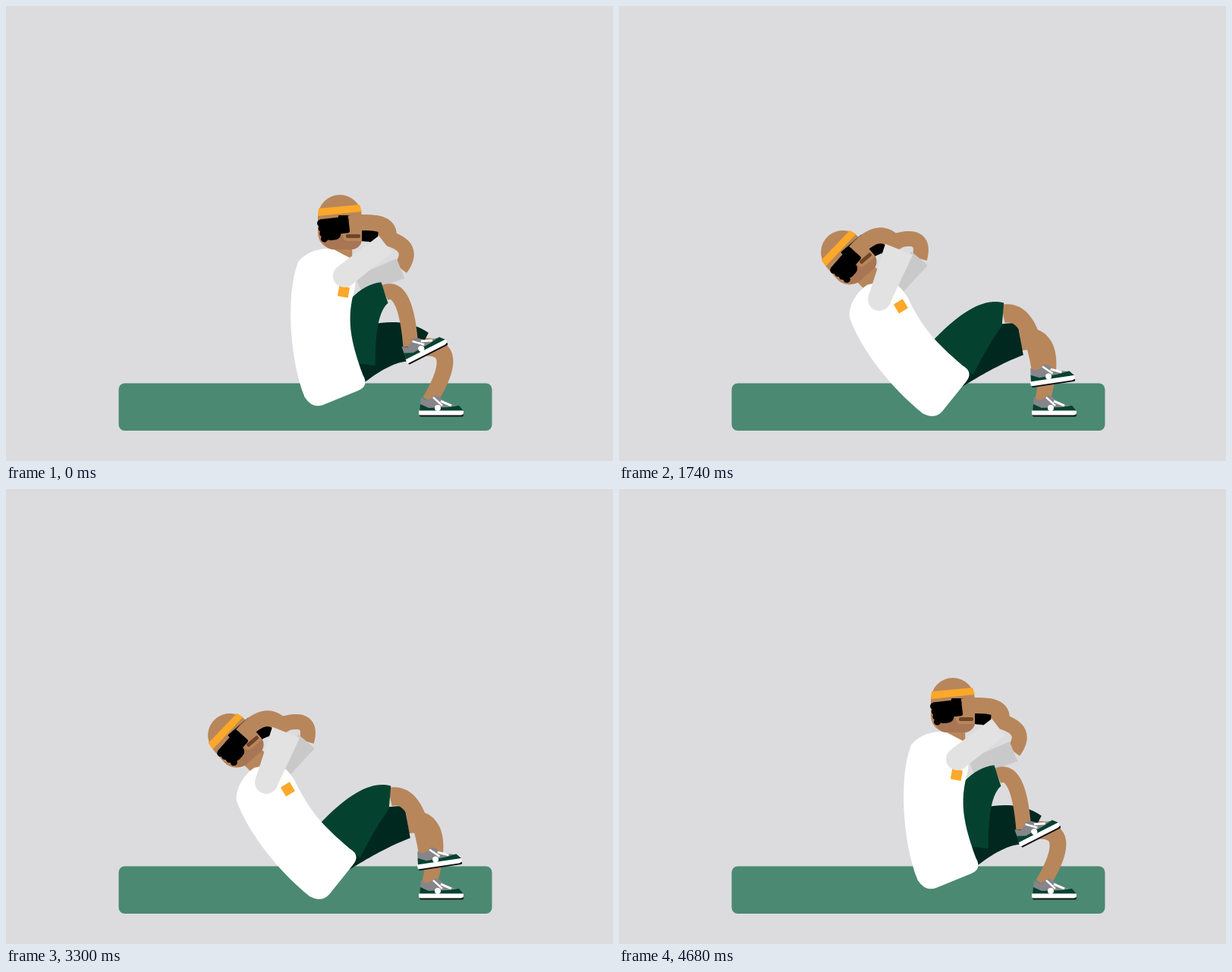
These frames come from a looping animation (800 px wide and 600 px high, 4710 ms). An HTML page with a canvas:

```html
<!DOCTYPE html>
<html lang="en">
<head>
<meta charset="utf-8">
<title>Bicycle crunches</title>
<style>
html, body { margin: 0; width: 100%; height: 100%; overflow: hidden; background: #dcdcde; }
canvas { display: block; width: 800px; height: 600px; }
</style>
</head>
<body>
<canvas id="stage" width="800" height="600"></canvas>
<script>
const ctx = document.getElementById('stage').getContext('2d');
const LOOP = 4710, CRUNCH = 780, STEP = 30;
const SKIN = '#b8865b', BEARD = '#a87654', BAND = '#fca829', BLACK = '#000';
const NEAR = '#04422f', FAR = '#01281f';
const PELVIS = [438, 514], PLANT = [559, 543];

// Joints while sitting up, halfway and almost lying
const MID = 0.44, LOW = 0.874;
const TORSO = {
  neck: [[443, 326], [340, 364], [265, 445]],
  head: [[440, 278], [295, 325], [210, 446]],
  shoulder: [[446, 356], [343, 387], [283, 468]],
  sleeve: [[500, 314], [369, 321], [266, 396]],
  elbow: [[519, 279], [347, 283], [245, 369]],
  wrist: [[452, 287], [311, 324], [223, 436]],
  farShoulder: [[465, 368], [360, 375], [289, 433]],
  farSleeve: [[520, 346], [396, 333], [292, 393]],
  farElbow: [[547, 310], [408, 290], [276, 352]],
  farWrist: [[480, 302], [342, 318], [218, 406]]
};
const PLANTED = {
  hip: [[455, 466], [438, 470], [418, 494]],
  thigh: [[512, 432], [490, 446], [484, 446]],
  knee: [[547, 450], [529, 439], [515, 449]],
  calf: [[604, 445], [580, 432], [550, 426]],
  heel: [PLANT, PLANT, PLANT]
};
const RAISED = {
  hip: [[452, 470], [438, 466], [418, 480]],
  thigh: [[462, 390], [482, 404], [470, 418]],
  knee: [[499, 378], [506, 406], [512, 432]],
  calf: [[527, 366], [543, 398], [545, 418]],
  heel: [[530, 473], [543, 503], [554, 525]]
};

const lerp = (a, b, k) => a + (b - a) * k;
const mixPoint = (p, q, k) => [lerp(p[0], q[0], k), lerp(p[1], q[1], k)];

// Quadratic through the three poses
function blend([a, b, c], u) {
  const wa = (u - MID) * (u - LOW) / (MID * LOW);
  const wb = u * (u - LOW) / (MID * (MID - LOW));
  const wc = u * (u - MID) / (LOW * (LOW - MID));
  return a.map((v, i) => v * wa + b[i] * wb + c[i] * wc);
}

function pose(joints, u) {
  const out = {};
  for (const name in joints) out[name] = blend(joints[name], u);
  return out;
}

// Maps local coordinates of a turned part to the stage
function frame([ox, oy], deg) {
  const a = deg * Math.PI / 180, c = Math.cos(a), s = Math.sin(a);
  return (x, y) => [ox + x * c - y * s, oy + x * s + y * c];
}

function place([x, y], deg, paint) {
  ctx.save();
  ctx.translate(x, y);
  ctx.rotate(deg * Math.PI / 180);
  paint();
  ctx.restore();
}

// Tapered band along a quadratic curve
function tube(p, c, q, w0, w1, color) {
  const left = [], right = [], n = 20;
  for (let i = 0; i <= n; i++) {
    const t = i / n, a = mixPoint(p, c, t), b = mixPoint(c, q, t);
    const [x, y] = mixPoint(a, b, t);
    const dx = b[0] - a[0], dy = b[1] - a[1];
    const k = lerp(w0, w1, t) / 2 / Math.hypot(dx, dy);
    left.push([x + dy * k, y - dx * k]);
    right.unshift([x - dy * k, y + dx * k]);
  }
  shape([...left, ...right], color);
}

const bar = (p, q, w0, w1, color) => tube(p, mixPoint(p, q, .5), q, w0, w1, color);

function shape(points, color) {
  ctx.beginPath();
  for (const p of points) ctx.lineTo(...p);
  ctx.fillStyle = color;
  ctx.fill();
}

function box(x, y, w, h, r, color) {
  ctx.beginPath();
  ctx.roundRect(x, y, w, h, r);
  ctx.fillStyle = color;
  ctx.fill();
}

function dot([x, y], r, color) {
  ctx.beginPath();
  ctx.arc(x, y, r, 0, 7);
  ctx.fillStyle = color;
  ctx.fill();
}

function drawShirt(chest, pelvis, drop) {
  const curve = (...pts) => ctx.bezierCurveTo(...pts.flat());
  const bend = (...pts) => ctx.quadraticCurveTo(...pts.flat());
  ctx.beginPath();
  ctx.moveTo(...chest(15, 6));
  bend(chest(23, 18), chest(23, drop - 6));
  curve(chest(17, 85), pelvis(41, -62), pelvis(40, -14));
  bend(pelvis(43, 3), pelvis(26, 3));
  ctx.lineTo(...pelvis(-23, 4));
  bend(pelvis(-38, 4), pelvis(-42, -14));
  curve(pelvis(-43, -68), chest(-66, 64), chest(-56, 20));
  curve(chest(-50, 8), chest(-34, -3), chest(-13, -4));
  bend(chest(3, 2), chest(15, 6));
  ctx.fillStyle = '#fff';
  ctx.fill();
}

function paintHead() {
  box(-29, -29, 58, 72, [29, 29, 15, 22], SKIN);
  box(-22, 24, 51, 19, [6, 0, 15, 15], BEARD);
  box(4, 19, 25, 13, [0, 0, 0, 6], SKIN);
  box(8, 23, 19, 5, 2, '#6f4529');
  box(-2, -2, 36, 7, 1, BLACK);
  shape([[-28, -11], [26, -16], [29, -7], [-29, -1]], BAND);
}

function paintGlove() {
  box(-39, -10, 39, 22, 3, BLACK);
  box(-34, 2, 22, 17, 8, BLACK);
  for (let i = 0; i < 4; i++) dot([-37 + i * .8, -5 + i * 7], 4.6, BLACK);
}

function paintShoe() {
  shape([[3, -25], [10, -21], [17, -24], [22, -28], [28, -25], [35, -18], [50, -14], [58, -7], [1, -7]], '#85858a');
  shape([[2, -16], [13, -11], [38, -12], [53, -14], [59, -7], [1, -5]], NEAR);
  bar([19, -25], [31, -14], 2.5, 2.5, '#fff');
  bar([29, -20], [43, -14], 3, 3, '#fff');
  dot([25, -11], 4, '#fff');
  box(1, -3, 58, 3.5, 2, '#111');
  box(0, -7.5, 59, 6, [0, 1, 4, 2], '#fff');
}

function drawLeg(u, raised, isFar) {
  const leg = pose(PLANTED, u);
  let tilt = 0;
  if (raised) {
    // The lifted leg meets the planted pose at the very bottom
    const lifted = pose(RAISED, u);
    for (const name in leg) leg[name] = mixPoint(lifted[name], leg[name], u ** 20);
    tilt = -27 * (1 - u) ** 2;
  }
  const { hip, thigh, knee, calf } = leg;
  const heel = isFar ? [leg.heel[0] - 15, leg.heel[1] - 2] : leg.heel;
  const ankle = frame(heel, tilt)(14, -20);

  tube(knee, calf, ankle, raised ? 21 + 19 * u * u : 24 + 16 * u, 20, SKIN);
  const cuff = raised ? lerp(29, 43, u ** 20) : 43;
  tube(hip, thigh, knee, 70, cuff, isFar ? FAR : NEAR);
  place(heel, tilt, paintShoe);
}

function draw(t) {
  const u = (1 - Math.cos(2 * Math.PI * t / CRUNCH)) / 2;
  const nearUp = Math.cos(Math.PI * t / CRUNCH) >= 0;
  const j = pose(TORSO, u);
  const lean = 8 - 93 * u, drop = 50 - 14 * u;
  const chest = frame(j.neck, lean);
  const pelvis = frame(PELVIS, -21 - 66 * u);

  ctx.fillStyle = '#dcdcde';
  ctx.fillRect(0, 0, 800, 600);
  box(148.5, 497.5, 492, 62.5, 8, '#4b8973');

  tube(j.farWrist, j.farElbow, j.farSleeve, 20, 20, SKIN);
  bar(mixPoint(j.farWrist, j.farElbow, .15), mixPoint(j.farWrist, j.farElbow, -.2), 17, 19, BLACK);
  bar(j.farShoulder, j.farSleeve, 24, 28, '#c9c9ca');

  drawLeg(u, !nearUp, true);
  drawLeg(u, nearUp, false);

  bar(j.head, chest(0, 12), 32, 30, SKIN);
  drawShirt(chest, pelvis, drop);
  place(j.head, -93 * u, paintHead);
  place(chest(9, drop), lean + 2, () => box(-7, -7, 14, 14, 1, BAND));

  tube(j.wrist, j.elbow, j.sleeve, 21, 21, SKIN);
  dot(j.shoulder, 15, '#e2e2e3');
  bar(j.shoulder, j.sleeve, 30, 28 + 17 * Math.sin(u * Math.PI / 2), '#e2e2e3');
  const reach = Math.atan2(j.elbow[1] - j.wrist[1], j.elbow[0] - j.wrist[0]);
  place(j.wrist, reach * 180 / Math.PI, paintGlove);
}

const start = performance.now();
function tick() {
  const t = (performance.now() - start) % LOOP;
  draw(Math.floor(t / STEP) * STEP);
  requestAnimationFrame(tick);
}
tick();
</script>
</body>
</html>
```
